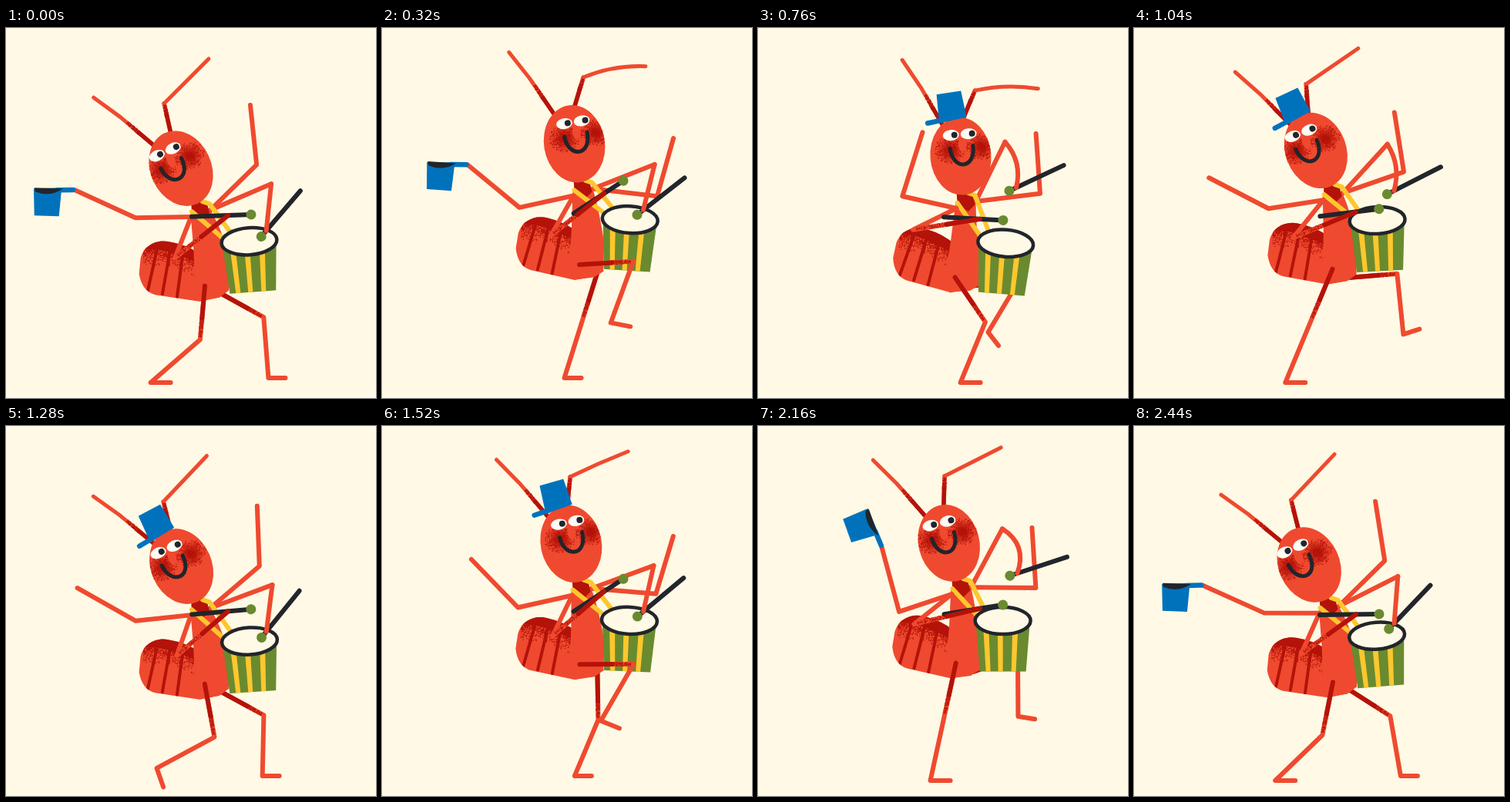
An HTML page with a canvas that plays this animation: 480x480 px, repeating every 2.48 s.

```html
<!DOCTYPE html>
<html lang="en">
<head>
<meta charset="utf-8">
<title>Drumming ant</title>
<style>
html, body { margin: 0; width: 100%; height: 100%; overflow: hidden; background: #fff9e6; }
canvas { display: block; width: 100vw; height: 100vh; }
</style>
</head>
<body>
<canvas id="stage"></canvas>
<script>
const SIZE = 480, LOOP = 2480, STRIDE = LOOP / 2, STEP = 40;
const BG = '#fff9e6', RED = '#ef4a2f', DARK = '#b41309', INK = '#22252a',
      BLUE = '#0072bc', GREEN = '#6a8a2f', YELLOW = '#fdc72d';

const canvas = document.getElementById('stage');
const ctx = canvas.getContext('2d');
const scale = window.devicePixelRatio || 1;
canvas.width = canvas.height = SIZE * scale;

// ---- motion ----
const rad = degrees => degrees * Math.PI / 180;
const beat = t => Math.cos(2 * Math.PI * t / STRIDE);

// swing once per stride, plus an optional bounce twice per stride; peaks in ms
const wave = (mean, swing, peak, bounce = 0, bouncePeak = 0) => t =>
  mean + swing * beat(t - peak) + bounce * beat(2 * (t - bouncePeak));

const hipX = wave(255.5, 1.5, 1200), hipY = wave(340, 2, 0, 13, 24);
const bellyTurn = wave(3.5, 4, 620);
const neckSway = wave(4, 11, 640);
const headTilt = wave(-12.5, 12.5, 580), faceShift = wave(-2, 9, 520);
const drumX = wave(64, 6, 540), drumY = wave(-75, 5, 660, 6.5, 124), drumTilt = wave(1.5, 6, 560);

const nearFootX = wave(249.5, 65, 503, 8.5, 345), farFootX = wave(292, 67.5, 1077, 9, 125);
const nearHandY = wave(236, 11.5, 872, 10.5, 5), nearForearm = wave(153.5, 17.5, 778);
const ballX = wave(329, 3, 150), ballY = wave(236, 30, 186, 17, 11);
const freeUpper = wave(-14.6, 12.5, 565, 18, 291), freeFore = wave(-90, 10, 310, 7, 258);
const hatHandX = wave(144, 70, 660, 17.5, 60), hatHandY = wave(169, 43, 20);
const leftFeeler = wave(-128.5, 12, 590), rightFeeler = wave(-89, 17, 580);
const feelerTip = wave(-20, 27, 585), feelerBow = wave(0, 8, 540);

// carrying the hat slows the arm down and frees the feelers
const hatLag = t => 40 * Math.sin(2 * Math.PI * (t - 640) / LOOP);
const hatOnHead = t => t >= 640 && t < 1860;

const polar = ([x, y], angle, r) => [x + r * Math.cos(rad(angle)), y + r * Math.sin(rad(angle))];

// middle joint of a limb with two fixed lengths
function bend(a, b, la, lb) {
  const dx = b[0] - a[0], dy = b[1] - a[1], d = Math.hypot(dx, dy);
  const along = d < la + lb ? (la * la - lb * lb + d * d) / (2 * d) : d * la / (la + lb);
  const out = d < la + lb ? Math.sqrt(Math.max(0, la * la - along * along)) : 0;
  return [a[0] + (dx * along + dy * out) / d, a[1] + (dy * along - dx * out) / d];
}

// p: ms since the foot left the ground
function step(hip, x, ground, p, thigh, shin, sole) {
  const AIR = 600;
  let lift = 0, pitch = 0;
  if (p < AIR) {
    lift = 78 * Math.sin(Math.PI * p / AIR);
    pitch = (22 + 50 * Math.cos(Math.PI * p / 560)) * Math.min(1, p / 40, (AIR - p) / 60);
  }
  const heel = [x, ground - lift];
  return [hip, bend(hip, heel, thigh, shin), heel, polar(heel, pitch, sole)];
}

// ---- drawing helpers ----
function random(seed) {
  return () => (seed = (seed * 16807) % 2147483647) / 2147483647;
}
function dots(count, seed, place) {
  const r = random(seed);
  return Array.from({ length: count }, () => place(r));
}
const blush = [11, 57].map(seed => dots(330, seed, r => {
  const a = r() * 2 * Math.PI, d = 20 * Math.pow(r(), .8);
  return [Math.cos(a) * d, Math.sin(a) * d * .9];
}));
const shade = dots(800, 91, r => {
  const u = r(), v = 1 - u;
  return [-78 * v * v - 100 * u * v, -68 * v * v - 144 * u * v - 46 * u * u - 2 + 24 * r() * r()];
});
const fray = dots(110, 23, r => [r() ** 1.5, (r() - .5) * 5]);

function speckle(points, size = 1.2) {
  ctx.fillStyle = DARK;
  for (const [x, y] of points) ctx.fillRect(x - size / 2, y - size / 2, size, size);
}
function stroke(color, width) {
  ctx.strokeStyle = color;
  ctx.lineWidth = width;
  ctx.stroke();
}
function line(points, color, width = 6) {
  ctx.beginPath();
  points.forEach(p => ctx.lineTo(...p));
  stroke(color, width);
}
function bowed(a, b, bow, width = 6) {
  const dx = b[0] - a[0], dy = b[1] - a[1], len = Math.hypot(dx, dy);
  ctx.beginPath();
  ctx.moveTo(...a);
  ctx.quadraticCurveTo((a[0] + b[0]) / 2 + 2 * bow * dy / len, (a[1] + b[1]) / 2 - 2 * bow * dx / len, ...b);
  stroke(RED, width);
}
// dark at a, crumbling away towards b
function darkEnd(a, b, solid, end, width = 6) {
  const dx = b[0] - a[0], dy = b[1] - a[1], len = Math.hypot(dx, dy);
  const at = (k, off = 0) => [a[0] + dx * k - dy / len * off, a[1] + dy * k + dx / len * off];
  line([a, at(solid)], DARK, width);
  speckle(fray.map(([u, v]) => at(solid + (end - solid) * u, v)), 1.1);
}
function shape(points, color) {
  ctx.beginPath();
  points.forEach(p => ctx.lineTo(...p));
  ctx.closePath();
  ctx.fillStyle = color;
  ctx.fill();
}
function oval(x, y, rx, ry, color) {
  ctx.beginPath();
  ctx.ellipse(x, y, rx, ry, 0, 0, 7);
  ctx.fillStyle = color;
  ctx.fill();
}
function within([x, y], degrees, draw) {
  ctx.save();
  ctx.translate(x, y);
  ctx.rotate(rad(degrees));
  draw();
  ctx.restore();
}
function drawStick(at, angle, from, to, ball) {
  within(at, angle, () => {
    line([[from, 0], [to, 0]], INK);
    oval(ball, 0, 6.5, 6.5, GREEN);
  });
}

// ---- parts ----
function drawLeg(points) {
  line(points, RED);
  darkEnd(points[0], points[1], .6, .95);
}

function drawFeelers(head, t) {
  const left = leftFeeler(t), right = rightFeeler(t);
  const base = polar(head, left, 46), joint = polar(head, left, 103);
  line([base, joint, polar(joint, left - 4, 43)], RED, 5);
  darkEnd(base, joint, .45, .8, 5.5);

  const root = polar(head, .7 * right - 33, 46), knee = polar(head, right, 87);
  bowed(knee, polar(knee, feelerTip(t), 82), Math.max(0, feelerBow(t)), 5);
  line([root, knee], RED, 5.5);
  darkEnd(root, knee, .6, .95, 5.5);
}

function drawBelly() {
  ctx.beginPath();
  ctx.moveTo(-6, -62);
  ctx.quadraticCurveTo(-22, -74, -46, -78);
  ctx.bezierCurveTo(-63, -81, -78, -72, -82, -56);
  ctx.lineTo(-84, -36);
  ctx.quadraticCurveTo(-80, -13, -63, -9);
  ctx.lineTo(-6, 0);
  ctx.lineTo(20, -5);
  ctx.lineTo(32, -14);
  ctx.closePath();
  ctx.fillStyle = RED;
  ctx.fill();
  ctx.clip();
  ctx.beginPath();
  ctx.moveTo(-78, -68);
  ctx.quadraticCurveTo(-50, -72, 0, -46);
  ctx.lineTo(0, -90);
  ctx.lineTo(-78, -90);
  ctx.fillStyle = DARK;
  ctx.fill();
  speckle(shade);
  for (let i = 0; i < 3; i++)
    line([[-61 + 17 * i, -66 + 2 * i], [-73 + 19 * i, -14 + 4 * i]], DARK, 4);
}

function drawThorax([nx, ny], [px, py]) {
  const waist = px - 10 + (nx - 257) / 2;
  ctx.beginPath();
  ctx.moveTo(nx - 11, ny + 4);
  ctx.lineTo(waist, py - 66);
  ctx.lineTo(px - 12, py - 20);
  ctx.lineTo(px - 6, py);
  ctx.lineTo(px + 20, py - 5);
  ctx.lineTo(px + 32, py - 14);
  ctx.lineTo(px + 33, py - 48);
  ctx.quadraticCurveTo(px + 28, py - 85, nx + 15, ny + 4);
  ctx.fillStyle = RED;
  ctx.fill();
  shape([[nx - 10, ny - 8], [nx + 10, ny - 8], [nx + 14, ny + 8], [nx + 5, ny + 17], [nx - 9, ny + 7]], DARK);
}

function drawDrum() {
  shape([[-35, 3], [35, 3], [30, 66], [-30, 66]], GREEN);
  for (const x of [-19, -3, 14])
    shape([[x * 1.15 - 3.5, 10], [x * 1.15 + 3.5, 10], [x + 3, 66], [x - 3, 66]], YELLOW);
  oval(0, 0, 36, 17.5, BG);
  stroke(INK, 4.5);
}

function drawHead(shift) {
  oval(0, 0, 39.5, 50.5, RED);
  ctx.clip();
  ctx.translate(shift, -28);
  [[-14, 19], [27, 18]].forEach((cheek, i) => within(cheek, 0, () => {
    const glow = ctx.createRadialGradient(0, 0, 3, 0, 0, 17);
    glow.addColorStop(0, DARK);
    glow.addColorStop(1, 'rgba(180,19,9,0)');
    oval(0, 0, 17, 16, glow);
    speckle(blush[i]);
  }));
  oval(2, 14, 5, 9, RED);
  for (const x of [-11.5, 11.5]) {
    oval(x, 0, 10.5, 7, '#fffdf5');
    oval(x + 4.5, 0, 4, 4, INK);
  }
  ctx.beginPath();
  ctx.moveTo(-14, 17);
  ctx.bezierCurveTo(-13, 46, 17, 47, 16, 16);
  stroke(INK, 5);
}

// origin is the brim tip
function drawHat(open) {
  shape([[17, -2], [19, -35], [51, -35], [53, 0], [20, 2]], BLUE);
  line([[2, 0], [22, -1]], BLUE, 6.5);
  if (!open) return;
  ctx.beginPath();
  ctx.moveTo(15, 1);
  ctx.lineTo(52, 1);
  ctx.lineTo(51, -4);
  ctx.quadraticCurveTo(32, -11, 15, 1);
  ctx.fillStyle = INK;
  ctx.fill();
}

function draw(t) {
  const lag = hatLag(t);
  const hips = [hipX(t), hipY(t)], [px, py] = hips;
  const neck = [px + neckSway(t), py - 122.5], [nx, ny] = neck;
  const tilt = headTilt(t), head = polar(neck, tilt - 90, 55);
  const rim = [px + drumX(t), py + drumY(t)], lean = drumTilt(t);

  const shoulder = [nx + 15, ny + 4];
  const ball = [ballX(t), ballY(t)], farAngle = -23 - .41 * (ball[1] - 206);
  const farHand = polar(ball, farAngle, 10), farElbow = bend(shoulder, farHand, 86, 61);
  const freeElbow = polar(shoulder, freeUpper(t), 84);

  const hatShoulder = [nx - 10, ny + 13];
  const hatHand = [hatHandX(t + lag), hatHandY(t + lag)];
  const hand = [288, nearHandY(t)], elbow = polar(hand, nearForearm(t), 88);

  ctx.setTransform(canvas.width / SIZE, 0, 0, canvas.height / SIZE, 0, 0);
  ctx.fillStyle = BG;
  ctx.fillRect(0, 0, SIZE, SIZE);
  ctx.lineCap = ctx.lineJoin = 'round';

  drawLeg(step([px + 24, py - 9], farFootX(t), 454, (t + STRIDE - 595) % STRIDE, 61, 79, 22));
  line([shoulder, freeElbow, polar(freeElbow, freeFore(t), 78)], RED);
  line([shoulder, farElbow], RED);
  line([hatShoulder, bend(hatShoulder, hatHand, 72, 87), hatHand], RED);

  within(hips, bellyTurn(t), drawBelly);
  drawThorax(neck, hips);

  const strapEnd = (x, y) => polar(polar(rim, lean, x), lean + 90, y);
  line([[nx - 9, ny + 6], strapEnd(-32, -5)], YELLOW);
  line([[nx + 5, ny - 7], [nx + 14, ny - 4], strapEnd(-23, -13)], YELLOW);

  drawFeelers(head, t - lag);
  within(head, tilt, () => drawHead(faceShift(t)));
  within(rim, lean, drawDrum);

  drawStick(ball, farAngle, 0, 78, 0);
  bowed(farElbow, farHand, Math.max(0, (243 - ball[1]) / 4));

  drawLeg(step([px + 1, py - 20], nearFootX(t), 460, t % STRIDE, 70, 85, 26));

  line([hatShoulder, elbow, hand], RED);
  drawStick(hand, 1.1 * (hand[1] - 245), -47, 30, 30);
  darkEnd(hand, elbow, .5, .95);

  // the held hat tips over as the hand moves away from the head
  if (hatOnHead(t)) within(head, tilt, () => within([-41, -46], -4, () => drawHat(false)));
  else within(hatHand, Math.max(-178, -20 - 1.35 * (227 - hatHand[0])), () => drawHat(true));
}

const start = performance.now();
function tick() {
  const t = (performance.now() - start) % LOOP;
  draw(Math.floor(t / STEP) * STEP);
  requestAnimationFrame(tick);
}
tick();
</script>
</body>
</html>
```
